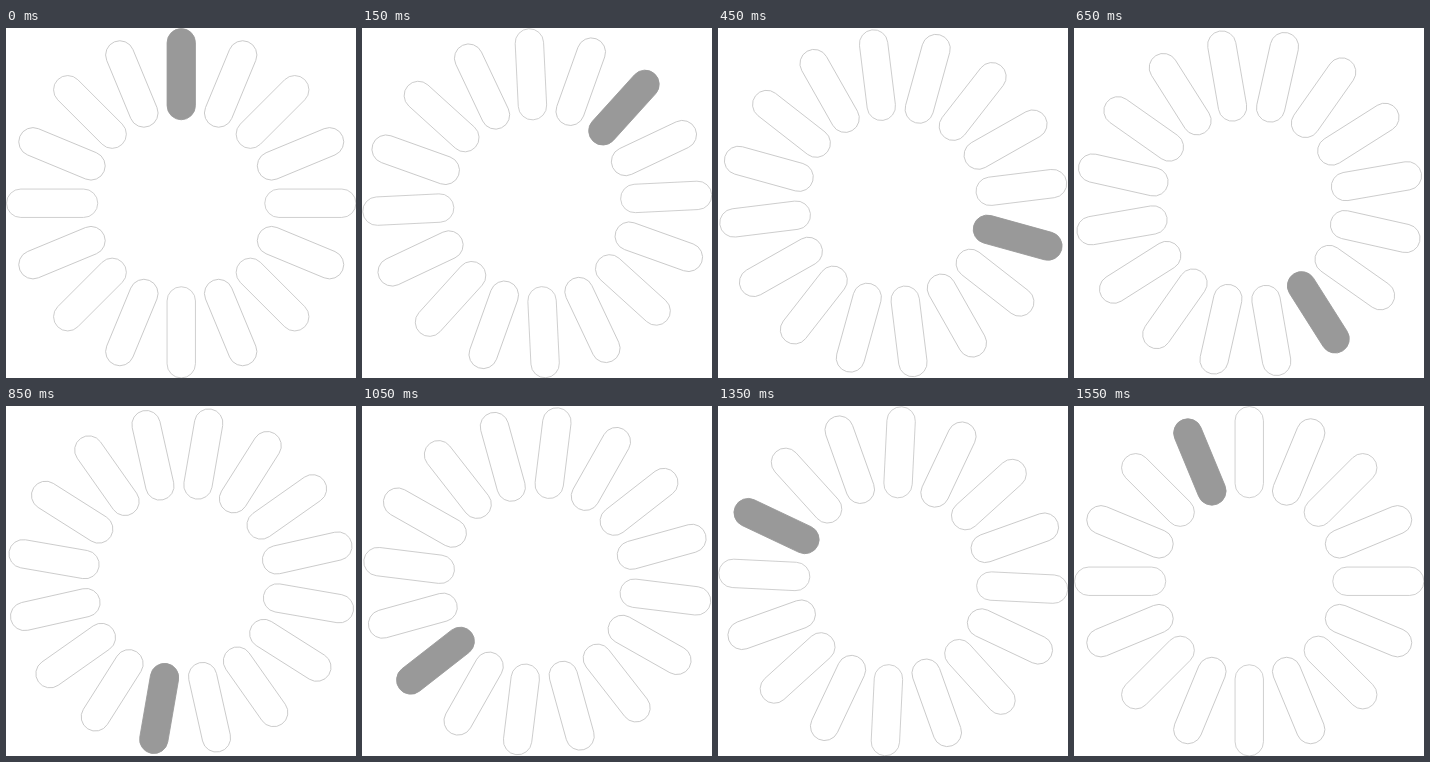
Animation of 350x350 px, one loop 1.6 s. Source, as an HTML page with a canvas:

```html
<!DOCTYPE html>
<html lang="en">
<head>
<meta charset="utf-8">
<title>Spinner</title>
<style>
  html, body { margin: 0; width: 100%; height: 100%; overflow: hidden; background: #fff; }
  canvas { display: block; }
</style>
</head>
<body>
<canvas id="stage" width="350" height="350"></canvas>
<script>
const ctx = document.getElementById('stage').getContext('2d');
const LOOP = 1600, STEP = 100, BARS = 16;
const CENTER = 175.25, INNER = 83.5, OUTER = 174.7, HALF = 14.2;
const SECTOR = 2 * Math.PI / BARS;
// The lit bar stops one sector short of a full turn.
const TURN = SECTOR * (BARS - 1) / BARS;

function bar(angle, lit) {
  ctx.save();
  ctx.translate(CENTER, CENTER);
  ctx.rotate(angle);
  ctx.beginPath();
  ctx.roundRect(-HALF, -OUTER, 2 * HALF, OUTER - INNER, HALF);
  if (lit) {
    ctx.fillStyle = ctx.strokeStyle = '#999';
    ctx.fill();
  } else {
    ctx.strokeStyle = '#c4c4c4';
  }
  ctx.lineWidth = 0.8;
  ctx.stroke();
  ctx.restore();
}

function draw(now) {
  const step = Math.floor((now % LOOP + STEP / 2) / STEP);
  ctx.fillStyle = '#fff';
  ctx.fillRect(0, 0, 350, 350);
  for (let i = 0; i < BARS; i++) bar(step * TURN + i * SECTOR, i === 0);
}

const start = performance.now();
function tick() {
  draw(performance.now() - start);
  requestAnimationFrame(tick);
}
tick();
</script>
</body>
</html>
```
